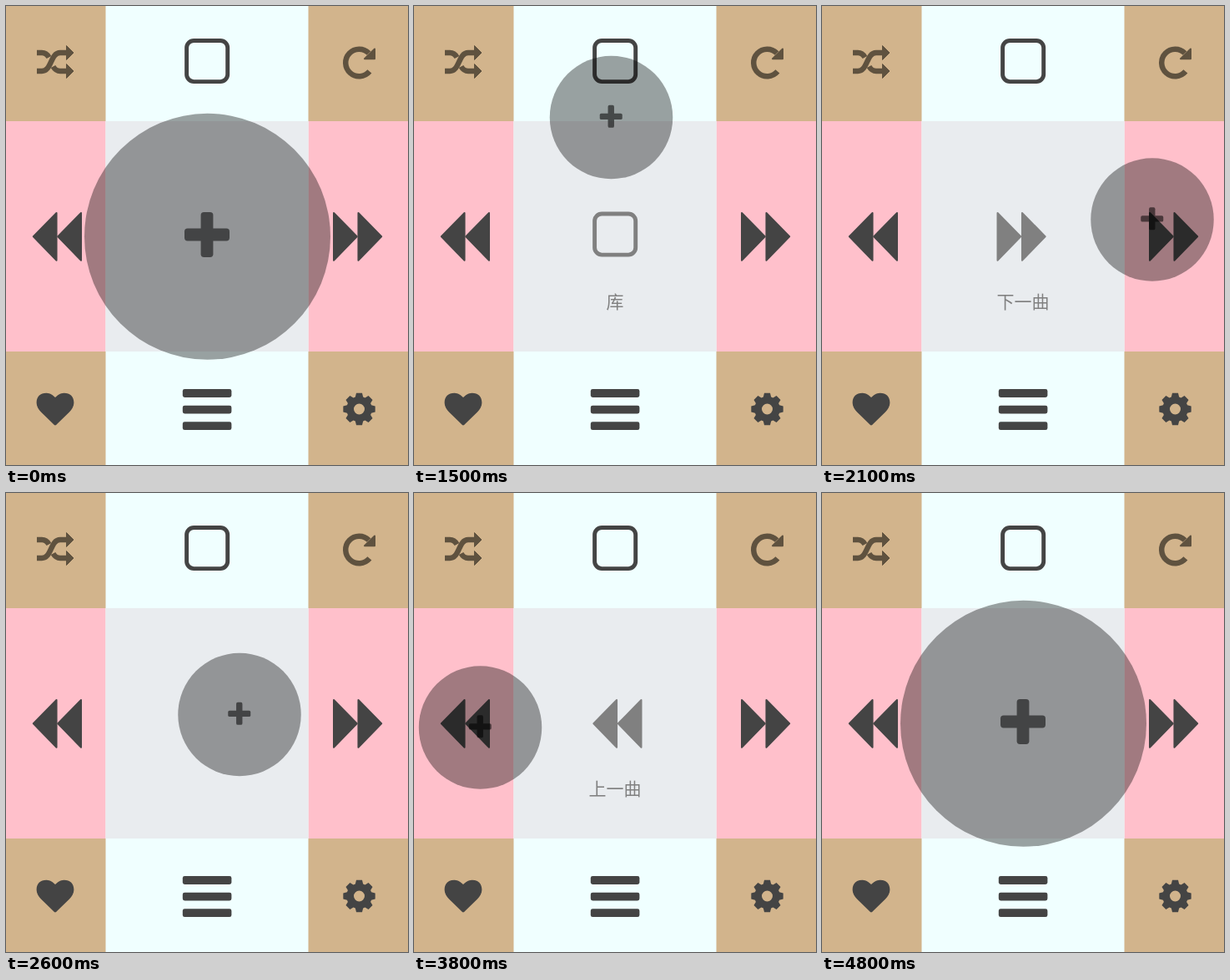
Animation, 482 px wide and 550 px high, one loop 6.1 s. Source, as an HTML page:

```html
<!DOCTYPE html>
<html lang="zh">
<head>
<meta charset="utf-8">
<title>Touch pad player</title>
<style>
html, body { margin: 0; width: 100%; height: 100%; overflow: hidden; }
svg { display: block; width: 482px; height: 550px; }
text { font: 21px "Noto Sans CJK SC", "Noto Sans CJK", sans-serif; text-anchor: middle; }
</style>
</head>
<body>
<svg viewBox="0 0 482 550">
  <defs>
    <path id="wedge" d="M1 -28.4L28.7 0L1 28.4Z" fill="currentColor" stroke="currentColor" stroke-width="2" stroke-linejoin="round"/>
    <rect id="bar" x="211.8" width="58.6" height="9.8" rx="2.4" fill="currentColor"/>
    <rect id="stop" x="216.6" y="41.5" width="49.1" height="49.1" rx="8.6" fill="none" stroke="currentColor" stroke-width="4.9"/>
    <g id="next">
      <use href="#wedge" x="392" y="276.3"/>
      <use href="#wedge" x="421.45" y="276.3"/>
    </g>
    <use id="prev" href="#next" transform="matrix(-1 0 0 1 483 0)"/>
    <g id="list">
      <use href="#bar" y="459.1"/>
      <use href="#bar" y="478.7"/>
      <use href="#bar" y="498.3"/>
    </g>
  </defs>

  <rect width="482" height="550" fill="#d2b48c"/>
  <rect y="138" width="482" height="276" fill="#ffc0cb"/>
  <rect x="119.5" width="243" height="550" fill="#f0ffff"/>
  <rect x="119.5" y="138" width="243" height="276" fill="#e9ecef"/>

  <g opacity=".54" fill="none" stroke="#000" stroke-width="6.5">
    <path d="M37 56H43C47 56 49.5 58 51.5 61.5M56.5 72.5C58.5 76 61 78 65 78H73"/>
    <path d="M37 78H43C55 78 53 56 65 56H73"/>
    <path d="M72.5 47.5L81 56L72.5 64.5ZM72.5 69.5L81 78L72.5 86.5Z" fill="#000" stroke-width="1" stroke-linejoin="round"/>
    <path d="M435 56.5A16.25 16.25 0 1 0 435.9 78.4"/>
    <path d="M442 51.5V63.3H430Z" fill="#000" stroke-width="2" stroke-linejoin="round"/>
  </g>

  <g fill="#444" color="#444">
    <use href="#stop"/>
    <use href="#prev"/>
    <use href="#next"/>
    <use href="#list"/>
    <path d="M59 502.4Q58.3 502.4 57.9 502L42.2 486.8C39 483.7 36.6 479.6 36.6 475.5C36.6 467.8 41 463.7 48.5 463.7C53 463.7 56.5 466.6 59 469.1C61.5 466.6 65 463.7 69.5 463.7C77 463.7 81.4 467.8 81.4 475.5C81.4 479.6 79 483.7 75.8 486.8L60.1 502Q59.7 502.4 59 502.4Z"/>
    <path id="gear" fill-rule="evenodd"/>
  </g>

  <g id="hint" color="#808080" fill="#808080">
    <use id="icon"/>
    <text id="label" x="241" y="362"></text>
  </g>

  <g id="knob">
    <circle r="147.5" fill-opacity=".37"/>
    <g opacity=".54">
      <rect x="-27.5" y="-9.7" width="54" height="14.8" rx="3.7"/>
      <rect x="-7.9" y="-29.3" width="14.8" height="54" rx="3.7"/>
    </g>
  </g>
</svg>
<script>
const LOOP = 6100, STEP = 100;
const $ = id => document.getElementById(id);
const mix = (a, b, p) => a + (b - a) * p;
const easeOut = p => Math.sin(p * Math.PI / 2);
const easeIn = p => 1 - Math.cos(p * Math.PI / 2);
const settle = p => 1 - (1 - p) ** 3;

// The knob rests at each stop until the next move, which lasts `dur` and ends at `at`.
const home = { x: 241.5, y: 276.3, size: 1 };
const stop = (at, dur, x, y) => ({ at, dur, x, y, size: 0.5 });
const stops = [
  stop(1000, 400, 235.5, 103.5),
  stop(1500, 100, 236.5, 133.5),
  stop(2100, 600, 396, 256),
  stop(2600, 500, 280, 265.5),
  stop(2800, 200, 273, 438),
  stop(3000, 200, 273.5, 475.5),
  stop(3200, 100, 274.5, 395),
  stop(3800, 600, 79.5, 281),
  stop(4000, 200, 70, 281),
  { at: 4800, dur: 500, ...home }
];

const zones = [
  { icon: '#stop', text: '库', dx: 0, dy: 207.5, hit: (x, y) => y < 138 },
  { icon: '#next', text: '下一曲', dx: -182.5, dy: 0, hit: x => x > 362.5 },
  { icon: '#list', text: '列表', dx: 0, dy: -207.5, hit: (x, y) => y > 414 },
  { icon: '#prev', text: '上一曲', dx: 182.5, dy: 0, hit: x => x < 119.5 }
];

// Drags swing round in an arc; pressing and releasing go straight.
function move(a, b, p) {
  const drag = a.size === b.size;
  return {
    x: mix(a.x, b.x, drag ? easeIn(p) : settle(p)),
    y: mix(a.y, b.y, drag ? easeOut(p) : settle(p)),
    size: mix(a.size, b.size, settle(p))
  };
}

function pose(t) {
  let from = home;
  for (const to of stops) {
    const p = (t - to.at + to.dur) / to.dur;
    if (p <= 0) return from;
    if (p < 1) return move(from, to, p);
    from = to;
  }
  return from;
}

function gearPath(cx, cy, teeth = 8, outer = 19.5, body = 15.3, hole = 6.5) {
  const pts = [];
  const add = (r, a) => pts.push(`${cx + r * Math.cos(a)} ${cy + r * Math.sin(a)}`);
  for (let i = 0; i < teeth; i++) {
    const mid = i * 2 * Math.PI / teeth;
    add(body, mid - 0.31);
    add(outer, mid - 0.18);
    add(outer, mid + 0.18);
    add(body, mid + 0.31);
  }
  const arc = `a${hole} ${hole} 0 1 0 `;
  return `M${pts.join('L')}ZM${cx - hole} ${cy}${arc}${2 * hole} 0${arc}${-2 * hole} 0Z`;
}

function draw(ms) {
  const t = Math.floor((ms % LOOP) / STEP) * STEP;
  const { x, y, size } = pose(t);
  $('knob').setAttribute('transform', `translate(${x} ${y}) scale(${size})`);
  const zone = zones.find(z => z.hit(x, y));
  $('hint').setAttribute('visibility', zone ? 'visible' : 'hidden');
  if (!zone) return;
  $('icon').setAttribute('href', zone.icon);
  $('icon').setAttribute('transform', `translate(${zone.dx} ${zone.dy})`);
  $('label').textContent = zone.text;
}

$('gear').setAttribute('d', gearPath(423.5, 483));
const start = performance.now();
function tick() {
  draw(performance.now() - start);
  requestAnimationFrame(tick);
}
draw(0);
requestAnimationFrame(tick);
</script>
</body>
</html>
```
